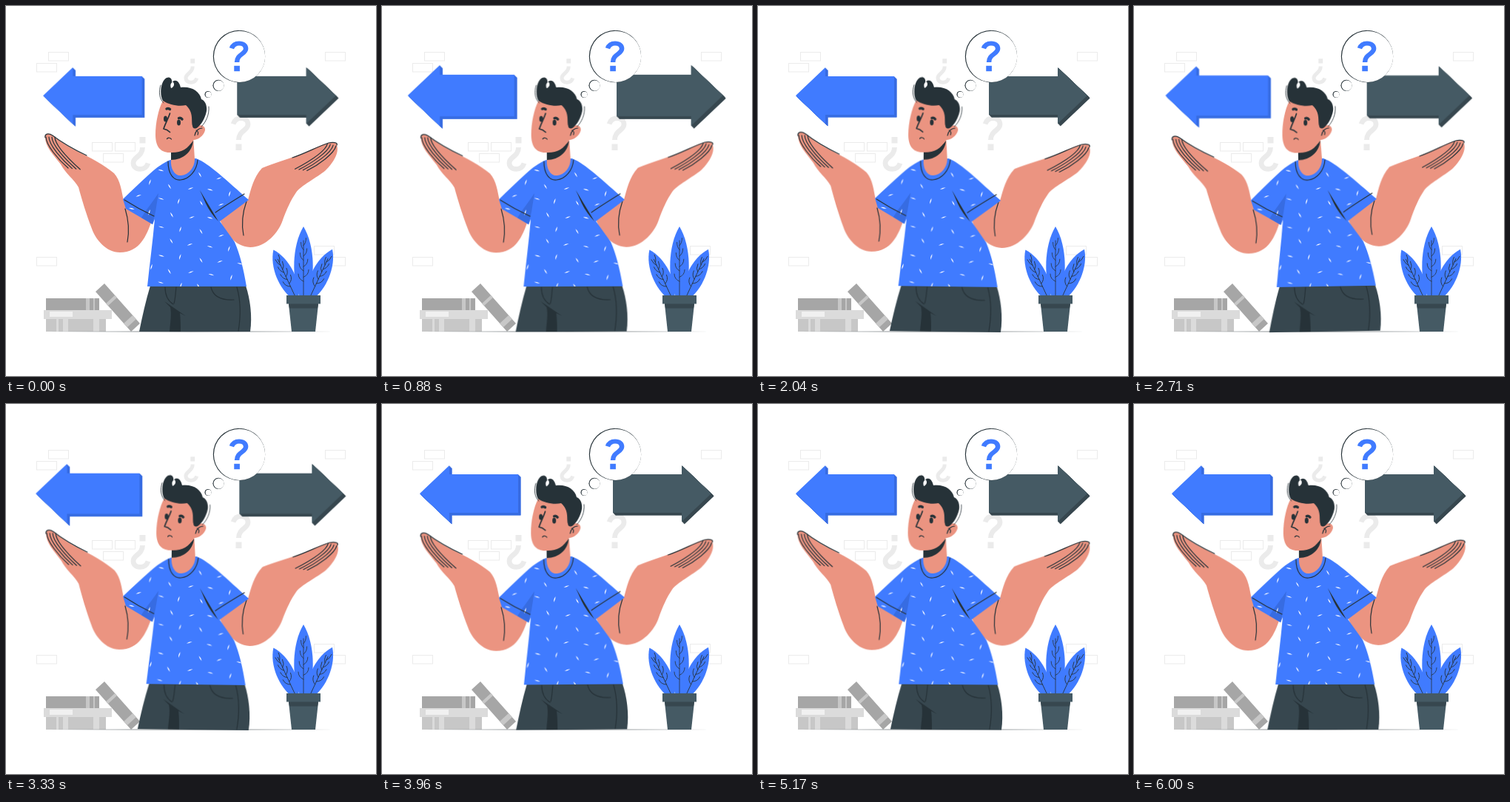
Write an HTML page that moves like this. It is 500 px wide and 500 px high and loops after 6.04 s.

```html
<!DOCTYPE html>
<html lang="en">
<head>
<meta charset="utf-8">
<title>Two directions</title>
<style>
html, body { margin: 0; width: 100%; height: 100%; overflow: hidden; background: #fff; }
svg { display: block; width: 100vw; height: 100vh; }
#arrows { transform-origin: 250px 122.5px; }
#man { transform-origin: 250px 268px; }
.blue { fill: #407bff; }
.deep { fill: #376ce2; }
.slate { fill: #455a64; }
.shade { fill: #37474f; }
.ink { fill: #263238; }
.skin { fill: #eb9481; }
.line { fill: none; stroke: #263238; stroke-width: 1.2; stroke-linecap: round; stroke-linejoin: round; }
.thin { stroke-width: .8; }
.bold { stroke-width: 1.7; }
.brow { stroke-width: 3.4; }
.mark { fill: none; stroke-width: 6.8; }
</style>
</head>
<body>
<svg viewBox="0 0 500 500" xmlns="http://www.w3.org/2000/svg">
  <defs>
    <clipPath id="shirtClip"><use href="#shirt"/></clipPath>
    <g id="ask">
      <path class="mark" d="M3 11.5C5 5.5 9 3.6 13.5 3.6C19.5 3.6 23 7 23 12C23 20.5 10.5 20 10.5 33"/>
      <path d="M6.5 38.5h8v8.5h-8z" stroke="none"/>
    </g>
    <g id="fingers" class="line"></g>
  </defs>

  <g id="bricks" fill="none" stroke="#ebebeb"></g>
  <g fill="#ebebeb" stroke="#ebebeb">
    <use href="#ask" transform="translate(304 148)"/>
    <use href="#ask" transform="translate(195 224) rotate(180)"/>
    <use href="#ask" transform="translate(260 106) rotate(180) scale(.74)"/>
  </g>

  <!-- books -->
  <path fill="#a6a6a6" d="M54 395h72v16H54zM121 386L133 375L181 429L169 440z"/>
  <path fill="#c7c7c7" d="M108 395h5v16h-5zM118 395h2v16h-2zM135 402L147 391L150 394L138 405zM159 429L171 418L176 423L164 434z"/>
  <path fill="#dbdbdb" d="M51 411h92v12H51z"/>
  <path fill="#f0f0f0" d="M59 413h31v7H59z"/>
  <path fill="#c7c7c7" d="M54 423h81v17H54z"/>
  <path fill="#dbdbdb" d="M68 423h3v17h-3zM77 423h7v17h-7zM118 423h8v17h-8z"/>

  <path fill="#8b9194" d="M54 440L250 439.2L446 440L250 440.8z"/>

  <g id="leaves"></g>
  <path class="slate" d="M382 403H422L418 440H386z"/>
  <path class="shade" d="M382 402H422L421 408.5H383z"/>
  <path class="slate" d="M379 391h46v11.5h-46z"/>

  <g id="arrows"></g>

  <g id="bubbles"></g>
  <use href="#ask" class="blue" stroke="#407bff" transform="translate(302 47.3) scale(.96 .87)"/>

  <g id="man">
    <!-- arms -->
    <path class="skin" d="M53 178C52 173 57 171 63 175C72 182 82 189 96 196C114 205 133 215 146 226C155 236 156 250 159 263L197 290C190 310 181 333 154 333C135 333 121 315 116 301C109 283 102 260 98 245C92 234 80 226 74 214C64 201 53 190 53 178z"/>
    <path class="skin" d="M447 188C449 184 441 184 436 185C425 188 415 193 402 199C385 206 362 212 346 219C334 232 331 248 327 262L289 289C296 305 308 325 330 326C352 326 368 305 373 292C379 275 385 262 392 252C398 243 420 232 432 222C441 213 451 199 447 188z"/>
    <use href="#fingers"/>
    <use href="#fingers" transform="translate(446 189) rotate(14) scale(-1 1) translate(-54 -177)"/>
    <path class="line" d="M53 178C52 173 57 171 63 175C76 185 92 194 109 202M447 188C449 184 441 184 436 185C421 190 405 199 387 205"/>
    <path class="line" d="M161 274C165 287 167 303 164 319M325 264C320 278 318 295 321 310"/>

    <!-- trousers -->
    <path class="shade" d="M195 378H324C330 396 333 419 330 440H180C184 420 189 398 195 378z"/>
    <path class="ink" d="M214 399L243 419L235 415C236 424 236 432 236 440H221C222 428 224 416 222 407z"/>
    <path class="line" d="M215 380C215 391 218 398 226 403M230 380C229 388 229 395 227 402M277 380C280 393 290 398 308 397M312 380C318 401 317 421 314 439"/>

    <!-- shirt -->
    <path id="shirt" class="blue" d="M222 208C212 212 204 218 194 227C182 238 170 249 158 261L162 274L198 295L201 288C198 320 194 350 191 379H325C321 355 316 335 309 319L289 291L328 262C312 248 300 237 287 226C276 217 267 210 257 206z"/>
    <path class="deep" d="M206 253C199 264 190 274 183 286L198 295L202 278z"/>
    <g id="flecks" fill="#fff" clip-path="url(#shirtClip)"></g>
    <path class="line" d="M160 262C174 271 187 278 200 284M283 279C296 270 309 262 322 254"/>
    <path class="ink" d="M262 249L287 291C280 284 274 275 270 267z"/>

    <!-- neck and head -->
    <path class="skin" d="M223 190V208C222 220 228 230 237 229C247 228 255 218 255 207L253 176z"/>
    <path class="line" d="M219 210C219 228 227 236 236 235C248 234 258 222 259 208"/>
    <path class="ink" d="M223 197C237 197 246 192 253 182C252 196 240 208 223 208z"/>
    <path class="skin" d="M212 128C206 139 202 158 202 174C202 189 208 198 221 198C236 199 246 194 252 181C258 182 267 176 269 168C270 161 261 159 256 164L254 134C240 122 222 122 212 128z"/>
    <path class="line" d="M265 165C260 165 256 169 255 175M257 168C260 169 260 172 259 174"/>
    <path class="ink" d="M212 128C207 120 209 101 217 97C222 95 225 99 224 104C227 98 234 100 236 110C250 108 262 115 264 126C269 128 272 134 271 142C269 152 264 160 259 164C255 167 252 165 252 162C250 154 254 144 243 134C234 136 221 134 212 128z"/>
    <path fill="#fff" d="M223 111C221 106 224 102 226 103C228 105 227 110 223 111z"/>
    <path class="line thin" d="M209 107C206 116 207 125 213 131M274 136C275 147 270 157 264 163"/>
    <path class="line brow" d="M217 139C218 138.5 220 138.5 221.5 139.5M233.5 151.5C235 151 237 151.5 238 153"/>
    <ellipse class="ink" cx="215.5" cy="152.5" rx="2.5" ry="4"/>
    <ellipse class="ink" cx="233.5" cy="157.5" rx="2.5" ry="4"/>
    <path class="line bold" d="M221.5 145C219 153 215 159 213 166C216 166.5 219 168 221.5 170.5"/>
    <path class="line" d="M217.5 179.5C219.5 177.5 222 178 223.5 180"/>
  </g>
</svg>

<script>
const LOOP = 6040;
const $ = id => document.getElementById(id);

function add(id, tag, attrs) {
  const el = document.createElementNS("http://www.w3.org/2000/svg", tag);
  for (const key in attrs) el.setAttribute(key, attrs[key]);
  $(id).append(el);
}

function seeded(seed) {
  return () => (seed = seed * 16807 % 2147483647) / 2147483647;
}

// Each patch of wall is a stair of bricks: x, y, count, step across, step down.
function bricks(x, y, count = 1, dx = 0, dy = 15) {
  for (let i = 0; i < count; i++)
    add("bricks", "rect", { x: x + dx * i + .5, y: y + dy * i + .5, width: 27, height: 11.5 });
}
bricks(57, 62, 2, -16);
bricks(116, 184, 2, 31, 0);
bricks(131, 199);
bricks(41, 339);
bricks(431, 62);
bricks(416, 324, 2, 15);

// The side faces are the front shape dragged down to the right.
function arrow(tip, head, back, front, side) {
  const d = `M${tip} 121L${head} 83V95H${back}V147H${head}V159z`;
  for (let s = 3.6; s >= 0; s -= .4)
    add("arrows", "path", { d, class: s > .2 ? side : front, transform: `translate(${s} ${s})` });
}
arrow(51, 91, 184, "blue", "deep");
arrow(445, 405, 312, "slate", "shade");

// An off-centre white disc leaves an outline that fades to the right.
function bubble(cx, cy, r) {
  add("bubbles", "circle", { cx, cy, r, class: "ink" });
  add("bubbles", "circle", { cx: cx + .6, cy: cy + .3, r: r - .55, fill: "#fff" });
}
bubble(315, 68, 35.2);
bubble(287, 107.3, 7.6);
bubble(273, 119.5, 4.5);

// A leaf is drawn upright from its base, then turned.
function leaf(x, y, length, width, angle) {
  const transform = `translate(${x} ${y}) rotate(${angle})`;
  const a = -length * .25, b = -length * .72;
  add("leaves", "path", {
    class: "blue", transform,
    d: `M-5 0C${-width} ${a} ${-width} ${b} 0 ${-length}C${width} ${b} ${width} ${a} 5 0z`
  });
  let veins = `M0 0V${-length * .8}`;
  for (let k = .22; k < .7; k += .15) {
    const w = width * .5 * (1.1 - k);
    veins += `M0 ${-length * k}q${-w} -3 ${-w} -10M0 ${-length * (k + .06)}q${w} -3 ${w} -10`;
  }
  add("leaves", "path", { class: "line thin", transform, d: veins });
}
leaf(391, 393, 70, 15, -25);
leaf(411, 393, 71, 15, 25);
leaf(402, 393, 95, 16, 0);

for (let i = 0; i < 4; i++)
  add("fingers", "path", {
    d: `M${54 + 4 * i} 177C${54 + 4 * i} 188 ${71 + 5 * i} 208 ${84 + 5.4 * i} ${219 + .6 * i}`
  });

// Flecks sit on slightly sloping, staggered rows and turn in a fixed cycle.
const rand = seeded(11);
const turns = [60, -20, 15, -72];
for (let row = 0; row < 9; row++)
  for (let col = 0; col < 7; col++) {
    const x = 152 + 27 * col + 14 * (row % 2) + 4 * rand();
    const y = 220 + 19 * row + .12 * (x - 205) + 4 * rand();
    const a = turns[(col + row * 2) % 4];
    add("flecks", "path", {
      d: "M-4 0Q0-1.700 4 0Q0 1.200-4 0z",
      transform: `translate(${x} ${y}) rotate(${a})`
    });
  }

// steps: [ms, value]
function play(id, steps, toTransform) {
  const frames = steps.map(([ms, v]) => ({ offset: ms / LOOP, transform: toTransform(v) }));
  $(id).animate(frames, { duration: LOOP, iterations: Infinity });
}

play("arrows", [[0, 1.004], [655, 1.1], [1855, 1], [2455, 1], [3055, 1.1], [3655, 1], [LOOP, 1]],
  v => `scale(${v})`);

// Even swing between the extremes, one way every 750 ms.
const sway = [[0, 0]];
for (let ms = 430, v = 1; ms < LOOP; ms += 750, v = -v) sway.push([ms, v]);
sway.push([LOOP, 0]);
play("man", sway, v => `rotate(${v}deg)`);
</script>
</body>
</html>
```
